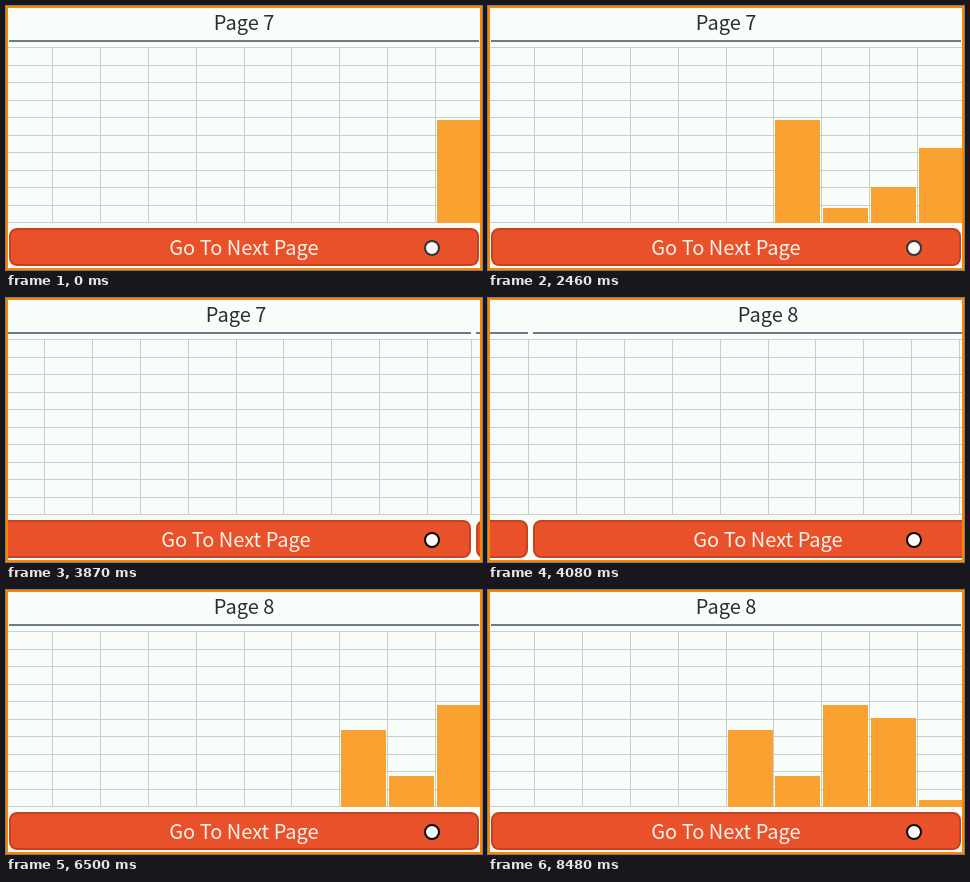
Recreate the animation shown at these times as an HTML page with a canvas. Size 476x264 px, loop 8.82 s.

```html
<!DOCTYPE html>
<html lang="en">
<head>
<meta charset="utf-8">
<title>Paged chart</title>
<style>
  html, body { margin: 0; width: 100%; height: 100%; overflow: hidden; background: #f8fdf9; }
  canvas { display: block; width: 476px; height: 264px; }
</style>
</head>
<body>
<canvas id="stage" width="476" height="264"></canvas>
<script>
const ctx = document.getElementById('stage').getContext('2d');
const W = 476, H = 264;
const LOOP = 8820, PRESS = 3720, SLIDE = 3870, STEP = 70, SLIDE_END = 4360;
const PAGE_STRIDE = 475, COLUMN = 47.88, FLOOR = 216;
const FONT = '300 20px "Noto Sans CJK JP", "Noto Sans CJK SC", "Noto Sans CJK", "Open Sans", sans-serif';

const pages = [
  { title: 'Page 7', times: [0, 460, 1460, 2460, 3470], tops: [114, 202, 181, 142, 161] },
  { title: 'Page 8', times: [4490, 5480, 6500, 7490, 8480], tops: [140, 186, 115, 128, 210] }
];

function rect(x, y, w, h, color) {
  ctx.fillStyle = color;
  ctx.fillRect(x, y, w, h);
}

function label(text, y, color) {
  ctx.fillStyle = color;
  ctx.fillText(text, 238, y);
}

function drawGrid() {
  for (let i = 0; i <= 10; i++) rect(2, Math.round(41 + 17.5 * i), 472, 1, '#c8cdcd');
}

function drawColumns(firstColumn) {
  for (let i = firstColumn; i < 9; i++) {
    rect(Math.round(46 + COLUMN * i), 41, 1, FLOOR - 40, '#c8cdcd');
  }
}

// The newest bar enters on the right and pushes the others left.
function drawBars(page, t) {
  const count = page.times.filter(start => t >= start).length;
  for (let i = 0; i < count; i++) {
    const x = Math.floor(431.5 - 47.85 * (count - 1 - i));
    rect(x, page.tops[i], 45, FLOOR + 1 - page.tops[i], '#f9a131');
  }
}

function drawButton(pressed) {
  ctx.beginPath();
  ctx.roundRect(4, 223, 468, 36, 7);
  ctx.fillStyle = pressed ? '#cf4525' : '#e8512a';
  ctx.fill();
  ctx.lineWidth = 2;
  ctx.strokeStyle = '#c54320';
  ctx.stroke();
  label('Go To Next Page', 249, '#fff3ec');
}

function drawPage(page, offset, firstColumn, t, showBars) {
  ctx.save();
  ctx.translate(offset, 0);
  drawColumns(firstColumn);
  if (showBars) drawBars(page, t);
  rect(3, 34, 470, 2, '#6a7b86');
  label(page.title, 24, '#2b2d2f');
  drawButton(t >= PRESS && t < SLIDE);
  ctx.restore();
}

function drawTouch(t) {
  ctx.beginPath();
  ctx.arc(426, 242, 7, 0, Math.PI * 2);
  ctx.fillStyle = '#fafafa';
  ctx.fill();
  ctx.lineWidth = 2;
  ctx.strokeStyle = t < SLIDE ? '#30353a' : '#0c0c0c';
  ctx.stroke();
}

// Critically damped spring, sampled at the slide's step rate.
function slideOffset(t) {
  if (t >= SLIDE_END) return 0;
  const sampled = Math.floor((t - SLIDE) / STEP) * STEP;
  const k = 18.26 * (sampled + 11) / 1000;
  return Math.round(PAGE_STRIDE * (1 + k) * Math.exp(-k));
}

function draw(t) {
  rect(0, 0, W, H, '#f8fdf9');
  ctx.font = FONT;
  ctx.textAlign = 'center';
  ctx.textBaseline = 'alphabetic';

  ctx.save();
  ctx.beginPath();
  ctx.rect(2, 2, W - 4, H - 4);
  ctx.clip();
  drawGrid();
  if (t < SLIDE) {
    drawPage(pages[0], 0, 0, t, true);
  } else {
    const offset = slideOffset(t);
    if (offset) drawPage(pages[0], offset - PAGE_STRIDE, 0, t, false);
    drawPage(pages[1], offset, -1, t, true);
  }
  drawTouch(t);
  ctx.restore();

  ctx.lineWidth = 2;
  ctx.strokeStyle = '#ff8400';
  ctx.strokeRect(1, 1, W - 2, H - 2);
}

const start = performance.now();
function tick() {
  draw((performance.now() - start) % LOOP);
  requestAnimationFrame(tick);
}
tick();
</script>
</body>
</html>
```
